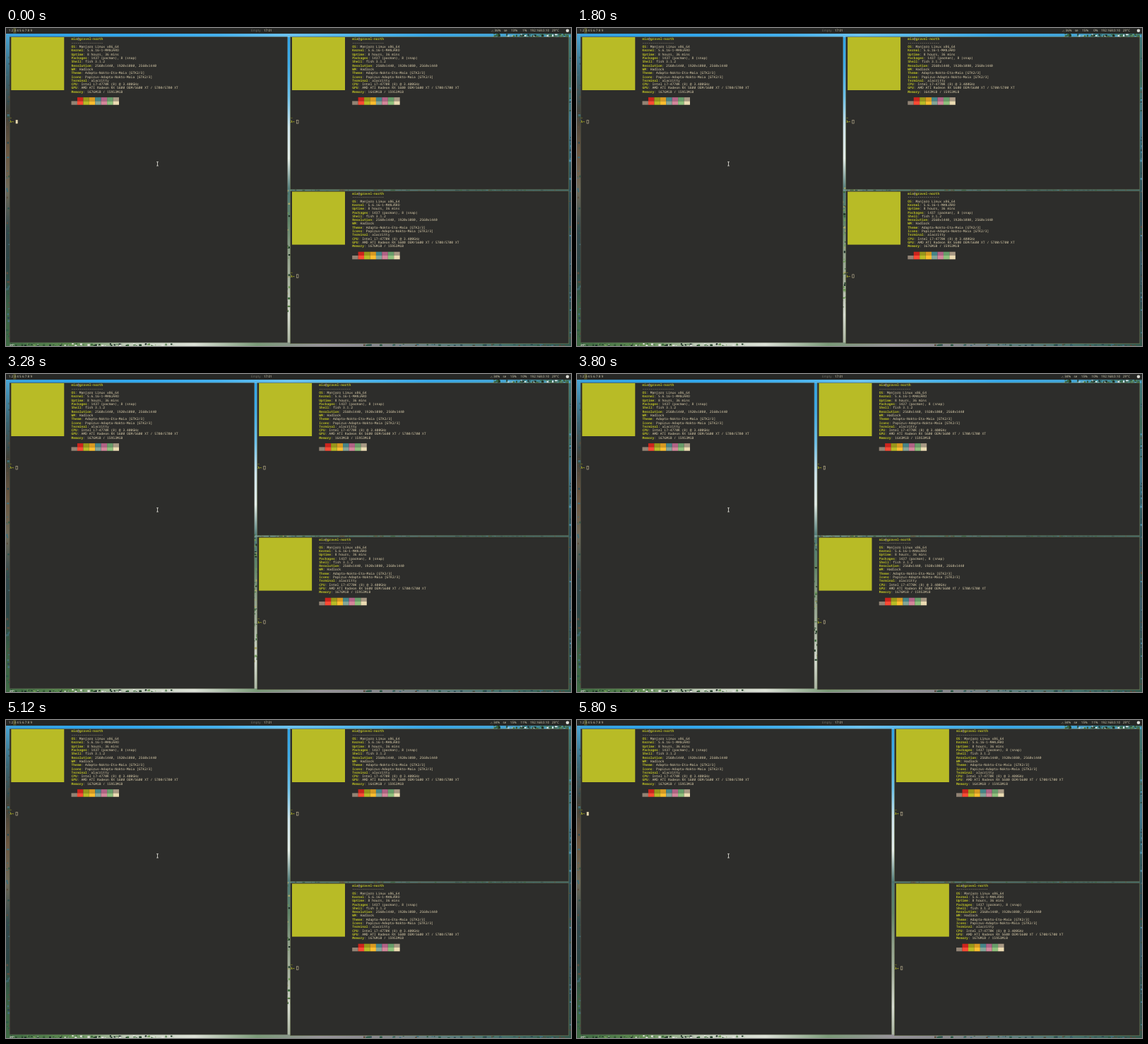
Recreate the animation shown at these times as an HTML page. Size 800x450 px, loop 6 s.

```html
<!DOCTYPE html>
<html lang="en">
<head>
<meta charset="utf-8">
<title>Tiling desktop</title>
<style>
  html, body { margin: 0; width: 100%; height: 100%; overflow: hidden; background: #2d2d2b; }
  svg { display: block; width: 100vw; height: 100vh; text-rendering: geometricPrecision; }
  .bar text { font: 4.55px "Noto Sans", "Open Sans", sans-serif; fill: #d5cdb4; }
  .bar .dim { fill: #6f6d63; }
  .term { font: 4.6875px "Noto Sans Mono", "DejaVu Sans Mono", monospace; fill: #ddd0ae; }
  .key { fill: #b8bb26; font-weight: 600; }
  .prompt { font-family: "DejaVu Sans Mono", monospace; font-weight: 700; }
  .pane { fill: #2d2d2b; stroke-width: .6; }
  .caret { stroke: #ebdbb2; stroke-width: .5; fill: none; }
  .caret.on { fill: #ebdbb2; }
</style>
</head>
<body>
<svg viewBox="0 0 800 450" preserveAspectRatio="none">
  <defs id="defs"></defs>
  <g id="wall"></g>
  <g class="bar">
    <rect width="800" height="8" fill="#262725"/>
    <rect x="10.2" y="0" width="4" height="7.6" fill="#4b4d2a"/>
    <g id="spaces"></g>
    <text class="dim" x="347" y="5">Empty</text>
    <text x="365" y="5">17:01</text>
    <g id="left-stats">
      <path d="M687.2 4.8h.9M688.6 3.4h.9M689.2 5h.8" stroke="#a59e8a" stroke-width=".7"/>
      <text id="vol" x="691.6" y="5"></text>
      <text x="704.9" y="5">se</text>
      <text id="mem" x="715.2" y="5"></text>
    </g>
    <text id="cpu" x="737.6" y="5" text-anchor="end"></text>
    <text x="742" y="5">192.168.0.10</text>
    <text x="773" y="5">29°C</text>
    <circle cx="795" cy="3.7" r="2.3" fill="#dcdcd6"/>
  </g>
  <g id="panes"></g>
  <path d="M213.2 189.4h2.6M214.5 189.4v5.6M213.2 195h2.6" stroke="#e8e6de" stroke-width=".8" fill="none"/>
</svg>
<script>
const LOOP = 6000, TICK = 40, STEP = 3.125, SPLIT = 403, RIGHT = 796.8;
// Character cell and top of the terminal text.
const CELL = 2.8125, LINE = 5.3125, TOP = 13.1;
const $ = id => document.getElementById(id);

const info = mem => [
  ['OS', 'Manjaro Linux x86_64'],
  ['Kernel', '5.6.16-1-MANJARO'],
  ['Uptime', '8 hours, 36 mins'],
  ['Packages', '1437 (pacman), 8 (snap)'],
  ['Shell', 'fish 3.1.2'],
  ['Resolution', '2560x1440, 1920x1080, 2560x1440'],
  ['WM', 'Hadlock'],
  ['Theme', 'Adapta-Nokto-Eta-Maia [GTK2/3]'],
  ['Icons', 'Papirus-Adapta-Nokto-Maia [GTK2/3]'],
  ['Terminal', 'alacritty'],
  ['CPU', 'Intel i7-4770K (8) @ 3.400GHz'],
  ['GPU', 'AMD ATI Radeon RX 5600 OEM/5600 XT / 5700/5700 XT'],
  ['Memory', mem + 'MiB / 15953MiB']
];
const swatches = [
  ['#2d2d2b', '#cc241d', '#98971a', '#d79921', '#458588', '#b16286', '#689d6a', '#a89984'],
  ['#928374', '#fb4934', '#b8bb26', '#fabd2f', '#83a598', '#d3869b', '#8ec07c', '#ebdbb2']
];

const rect = (x, y, w, h, fill) =>
  `<rect x="${x}" y="${y}" width="${w}" height="${h}" fill="${fill}"/>`;

function terminal(mem) {
  const text = (col, row, s, cls = '') =>
    `<text class="${cls}" x="${col * CELL}" y="${TOP + row * LINE + 4.3}">${s}</text>`;
  const rows = info(mem).map(([k, v], i) =>
    text(31, i + 2, `<tspan class="key">${k}</tspan>: ${v}`)).join('');
  const blocks = swatches.map((row, j) => row.map((c, i) =>
    rect((31 + 3 * i) * CELL, TOP + (16 + j) * LINE, 3 * CELL, LINE, c)).join('')).join('');
  return rect(2, 13, 75, 75, '#b8bb26') +
    text(31, 0, '<tspan class="key">mia</tspan>@<tspan class="key">gravel-north</tspan>') +
    text(31, 1, '-'.repeat(16)) + rows + blocks +
    text(0, 21, '~', 'key') +
    text(0, 22, 'λ→', 'key prompt') +
    `<rect class="caret" x="${3 * CELL + .25}" y="${TOP + 22 * LINE + .25}"
      width="${CELL - .5}" height="${LINE - .5}"/>`;
}

// Each pane: frame rectangle plus its terminal content.
const pane = (id, y, h, dy, mem, edge) =>
  `<rect class="pane" id="${id}" y="${y}" height="${h}" stroke="${edge}"/>
   <g class="term" id="${id}-text" data-dy="${dy}">${terminal(mem)}</g>`;

$('panes').innerHTML =
  pane('main', 12.7, 432.4, 0, 1676, '#56594a') +
  pane('top', 12.7, 215.8, 0, 1643, '#6a7450') +
  pane('low', 230.7, 216, 218.6, 1676, '#6a7450');

$('spaces').innerHTML = Array.from({ length: 9 }, (_, i) =>
  `<text x="${3.7 + i * 3.84}" y="5">${i + 1}</text>`).join('');

// Wallpaper: only the strips around the panes are ever visible.
function strip(id, x, y, w, h, colors) {
  const down = h > w;
  const stops = colors.map((c, i) =>
    `<stop offset="${i / (colors.length - 1)}" stop-color="${c}"/>`).join('');
  $('defs').innerHTML +=
    `<linearGradient id="${id}" x2="${down ? 0 : 1}" y2="${down ? 1 : 0}">${stops}</linearGradient>`;
  return rect(x, y, w, h, `url(#${id})`);
}

let seed = 7;
const rnd = () => (seed = seed * 16807 % 2147483647) / 2147483647;
const specks = (n, x, y, w, h, colors) => Array.from({ length: n }, () =>
  rect((x + rnd() * w).toFixed(1), (y + rnd() * h).toFixed(1),
    (1 + rnd() * 3).toFixed(1), (.8 + rnd() * 2.4).toFixed(1),
    colors[Math.floor(rnd() * colors.length)])).join('');

const leaves = ['#23402a', '#3c6a3c', '#6f9a5a', '#1f3028'];
const shade = ['#2c4a52', '#3f6d78', '#5a4a3c', '#2f5a48'];
$('wall').innerHTML =
  strip('gap', 300, 8, 180, 442, ['#2fa2e6', '#3fabe8', '#6cc0ea', '#cfe4ec', '#e3ece8',
    '#4f7a78', '#5f8468', '#8fa08a', '#a9b3a2', '#d5dad0', '#a5b09c']) +
  strip('sky', 0, 8, 800, 5, ['#3a9fd8', '#2fa4ea', '#34a8ec', '#45b0ec', '#6cc2ee',
    '#4fb4ea', '#38a6e6', '#45a4d4', '#3f6f60']) +
  strip('west', 0, 8, 5, 442, ['#4aa6d6', '#3a6878', '#3f4038', '#6a5640', '#6f6a58',
    '#34484c', '#2c4444', '#3a5f44', '#3f6a44']) +
  strip('east', 796.5, 8, 3.5, 442, ['#3f7a80', '#3c6a58', '#3f7a94', '#2f5a60', '#2c4a54',
    '#3a5a68', '#2f4c50', '#38584c']) +
  strip('mid', 330, 228, 467, 3, ['#7fa3a0', '#4b7470', '#4a6c74', '#34585c', '#3c6468']) +
  strip('floor', 0, 445, 800, 5, ['#3f6a44', '#5d8a50', '#c5d0be', '#dde2d8', '#7a9a78',
    '#98949a', '#86868c', '#5f7f80', '#44706a', '#33584c']) +
  specks(90, 690, 8, 108, 4, leaves.concat('#cfe4ec', '#4fa8d8')) +
  specks(90, 0, 446, 240, 3, leaves.concat('#e4e6df', '#c5d0be')) +
  specks(50, 500, 447, 300, 2, shade) +
  specks(60, 0, 40, 4, 400, shade) +
  specks(60, 797, 10, 2, 430, shade.concat('#4a90ac')) +
  specks(70, 340, 228, 450, 2, shade) +
  specks(500, 330, 225, 70, 180, leaves.concat('#a9a86a'));

// Resize bursts: start, end, number of updates, split offset (in steps) before and after.
const bursts = [
  [880, 1480, 10, 0, -5],
  [1680, 2200, 8, -5, -10],
  [2320, 2520, 4, -10, -11],
  [3080, 3520, 8, -11, -20],
  [4400, 5000, 10, -20, -3],
  [5080, 5680, 10, -3, 13],
  [5720, 5800, 2, 13, 15]
];
const solid = [[0, 880], [1520, 1680], [2200, 2320], [3520, 3720], [5800, LOOP]];

function splitAt(t) {
  let steps = 0;
  for (const [start, end, n, from, to] of bursts) {
    for (let k = 0; k < n; k++) {
      const at = start + Math.floor((end - start) * k / (n - 1) / TICK + 1e-6) * TICK;
      if (t >= at) steps = Math.round(from + (to - from) * (k + 1) / n);
    }
  }
  return SPLIT + steps * STEP;
}

function place(id, x, left, right) {
  const text = $(id + '-text');
  $(id).setAttribute('x', left);
  $(id).setAttribute('width', right - left);
  text.setAttribute('transform', `translate(${x} ${text.dataset.dy})`);
}

const caret = document.querySelector('#main-text .caret');

function draw(t) {
  const x = splitAt(t);
  place('main', 5.3, 5.2, x - 4.6);
  place('top', x, x - .4, RIGHT);
  place('low', x, x - .4, RIGHT);
  caret.classList.toggle('on', solid.some(([a, b]) => t >= a && t < b));

  const wide = t >= 2720;
  $('vol').textContent = wide ? '34%' : '36%';
  $('mem').textContent = t < 720 ? '13%' : '15%';
  $('cpu').textContent = t < 720 ? '1%' : !wide ? '0%' : t < 4720 ? '10%' : '11%';
  $('left-stats').setAttribute('transform', `translate(${wide ? -1.4 : 0} 0)`);
}

function loop() {
  draw(performance.now() % LOOP);
  requestAnimationFrame(loop);
}
loop();
</script>
</body>
</html>
```
